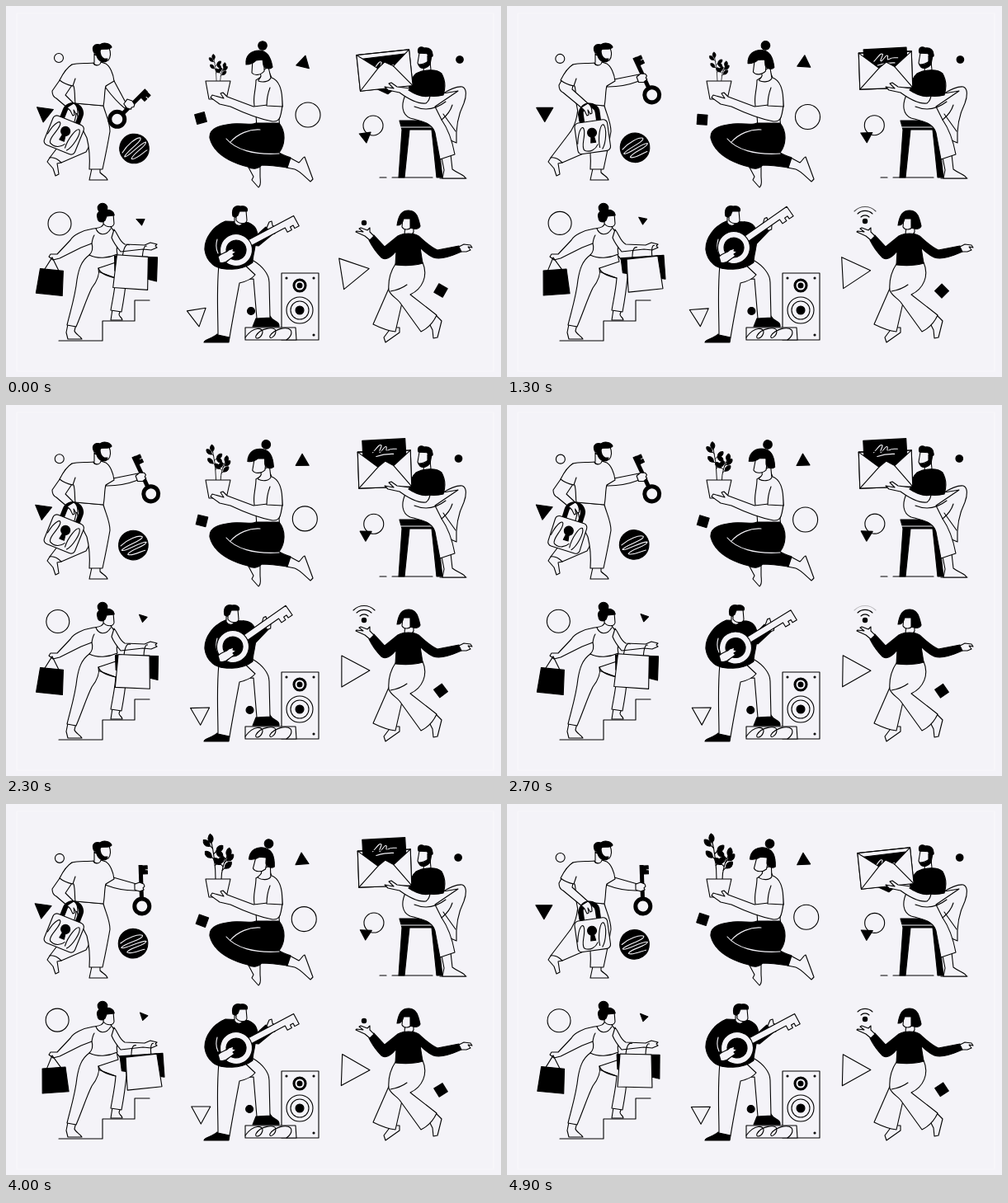
Write an HTML page that moves like this. It is 600 by 450 pixels and loops after 5000 ms.

```html
<!DOCTYPE html>
<html lang="en">
<head>
<meta charset="utf-8">
<title>Six figures</title>
<style>
:root { --paper: #f4f3f8; }
html, body { margin: 0; width: 100%; height: 100%; overflow: hidden; background: var(--paper); }
svg { display: block; width: 100%; height: 100%; fill: none; stroke: #000; stroke-width: 1.1; stroke-linejoin: round; stroke-linecap: round; }
.w { fill: var(--paper); }
.b { fill: #000; }
.l { stroke: var(--paper); }
</style>
</head>
<body>
<svg viewBox="0 0 600 450">
  <rect x="13" y="9" width="578" height="434" stroke="#f9f8fb"/>

  <!-- man with padlock and key -->
  <circle id="dotA" r="5.5"/>
  <path id="triA" class="b" d="M-10 -7H10L0 10Z"/>
  <g id="ball">
    <circle class="b" r="17.8"/>
    <path class="l" d="M-15 3C-8 -6 4 -13 9 -12C12 -8 -10 2 -13 8C-10 11 8 -6 15 -6C16 -1 -4 6 -5 12C0 14 10 6 15 4"/>
  </g>
  <path class="w" d="M86 122C85 140 80 150 72 159L53 184L50 189L57 197L60 206L64 204L62 191L67 190L97 177L112 150Z"/>
  <path d="M53 184C58 183 63 186 67 190"/>
  <path class="w" d="M104 197L101 211H123C122 207 118 206 114 202V197Z"/>
  <path class="w" d="M84 118L118 121C121 132 126 141 126 152C123 170 120 184 117 198H101C102 184 101 172 98 160L88 140Z"/>
  <path id="armR" class="w"/>
  <path class="w" d="M107 58V68C105 73 114 74 116 69V64Z"/>
  <path class="w" d="M106 69C98 70 86 69 80 71C73 76 69 83 66 91L82 97C84 104 83 112 84 118L118 121C120 112 119 104 121 97L131 91C130 82 126 73 121 70L115 68C114 73 107 73 106 69Z"/>
  <path id="armL" class="w"/>
  <path class="w" d="M80 71C73 75 69 82 65 90C70 94 76 96 81 97L84 88"/>
  <path class="w" d="M111 53L125 51C127 56 127 62 124 66C117 68 112 63 111 53Z"/>
  <path class="b" d="M109 53C109 61 112 67 118 68C121 68 123 67 123 64L119 64C115 62 114 58 114 54Z"/>
  <path class="b" d="M107 57C103 50 107 45 114 47C119 43 127 46 128 50C125 53 121 52 116 52C114 53 113 56 111 58Z"/>
  <g id="lock">
    <path d="M-10 17V5A10 9.5 0 0 1 10 5V17" stroke-width="6" stroke-linecap="butt"/>
    <rect class="w" x="-20" y="15" width="40" height="38" rx="5"/>
    <path d="M-19 40C-16 22 -9 17 -9 25C-9 34 -16 44 -12 49C-5 53 2 49 5 44M7 48C6 36 11 20 15 21C19 26 15 44 10 50"/>
    <circle class="b" cy="29" r="5.5"/><path class="b" d="M-1.5 32L-3 41H3L1.5 32Z"/>
  </g>
  <path id="handL" class="w" d="M-9 -2L-1 -7C3 -5 4 0 4 5L2 6L-1 1L0 7L-2 8L-5 2Z"/>
  <g id="key">
    <circle cy="23" r="9" stroke-width="5"/>
    <path d="M0 13V-27" stroke-width="5" stroke-linecap="butt"/>
    <path class="b" d="M2 -26H8V-22H5V-20H8V-16H2Z"/>
  </g>
  <path id="handR" class="w" d="M-8 -4L-2 -6L3 -4L4 -1L2 1L3 3L-2 5L-8 3Z"/>

  <!-- woman with plant -->
  <path id="sqB" class="b" d="M-6 -6H6V6H-6Z"/>
  <path id="triB" class="b" d="M0 -8L8 6H-8Z"/>
  <circle id="ringB" r="15"/>
  <g id="plant"></g>
  <path class="w" d="M242 91H272L267 113H246Z"/>
  <path class="w" d="M293 194L300 207L298 211L306 220C310 217 308 212 308 206V193Z"/>
  <path class="w" d="M344 184L355 190C358 188 359 184 362 183L372 210L369 213C362 207 356 200 350 198L340 196Z"/>
  <path class="w" d="M303 90C306 87 309 88 310 84L318 78L322 87C330 89 334 101 335 121L331 138L332 148H303C305 138 302 130 301 121C299 110 303 102 303 90Z"/>
  <path class="b" d="M247 160C246 147 260 145 274 143C288 142 297 145 303 142L331 142C340 153 338 169 331 178C336 181 340 182 345 184L341 196C328 194 318 193 310 193C307 197 300 199 293 195C274 190 252 180 247 160Z"/>
  <path class="l" d="M308 150C295 149 281 155 272 165M267 161C278 174 300 181 331 179"/>
  <path class="w" d="M317 120L300 122L268 110L263 105L260 106L264 112L250 108L248 111L259 119L272 122C291 131 307 137 323 140C333 141 333 132 335 121Z"/>
  <path class="w" d="M320 99C317 107 316 114 316 121L335 122C335 108 334 98 328 91"/>
  <g id="headB">
    <path class="w" d="M308 80L309 85C308 89 305 89 306 91C311 93 319 92 321 87L318 74Z"/>
    <path class="w" d="M299 64L298 81C301 85 309 84 313 79V65Z"/>
    <circle class="b" cx="311" cy="48" r="5.3"/>
    <path class="b" d="M291 71C290 60 297 54 307 54C317 54 321 62 323 74C320 77 316 76 313 74C311 71 312 68 311 65L303 66Q298 71 291 71Z"/>
  </g>

  <!-- man with letter -->
  <circle id="dotC" class="b" r="4.3"/>
  <circle id="ringC" r="12"/>
  <path id="triC" class="b" d="M-7 -6H7L0 6Z"/>
  <path d="M453 208H461M468 208H517M526 209H558"/>
  <path class="b" d="M477 139H521L529 208H522L516 150H489L483 208H476L480 150Z"/>
  <path class="l" d="M478 147H520"/>
  <path class="w" d="M528 107C538 101 546 97 553 98C559 100 558 110 555 118C549 130 545 148 546 166L532 160L512 138Z"/>
  <path class="w" d="M528 184L531 199L529 209H557C556 205 549 204 541 198L539 180Z"/>
  <path class="w" d="M485 106C478 120 480 132 490 136C505 140 517 142 520 154L526 186L544 180C541 164 535 148 528 138L520 122L548 103L530 106Z"/>
  <path d="M495 122C507 127 520 126 533 116M530 131L545 152M528 138Q538 130 541 120"/>
  <path class="w" d="M507 70L506 79C509 82 514 80 515 77L514 68Z"/>
  <path class="b" d="M497 82C506 77 522 76 528 82C532 89 533 99 530 108C520 111 508 109 499 107L488 101C490 92 492 86 497 82Z"/>
  <g id="mail">
    <path class="w" d="M-32 -22H32V22H-32Z"/>
    <g id="letter"><path class="b" d="M-26 0H26V30L0 46L-26 30Z"/><path class="l" d="M-14 15C-9 10 -5 4 -3 7C-4 12 -8 15 -5 15C-1 12 1 7 3 9C3 12 1 15 5 13C8 11 10 12 15 12M-10 20Q0 17 11 18"/></g>
    <path class="w" d="M-32 -22L-8 -3L1 -10L11 -4L32 -22V22H-32Z"/>
    <path d="M-32 22L-8 -3M32 22L11 -4M-32 -22H32"/>
  </g>
  <path class="w" d="M490 100L474 98L467 93L464 94L470 100L459 98L463 102L477 105C488 113 500 119 509 118C513 115 514 111 514 107Z"/>
  <path class="b" d="M492 98C497 92 506 90 514 96L514 109C506 111 497 108 488 102Z"/>
  <path class="w" d="M501 57L499 69C501 75 508 76 513 70L514 58Z"/>
  <path class="b" d="M511 60L511 67C508 71 503 71 500 71C502 77 509 77 514 71L516 60Z"/>
  <path class="b" d="M500 57C498 51 502 48 507 51C513 50 518 54 517 61L513 62L510 57Z"/>

  <!-- woman with bags -->
  <circle id="ringD" r="14"/>
  <path id="triD" class="b" d="M-5 -3.5H5L1.5 4Z"/>
  <path d="M64 406H117V382H156V357H174"/>
  <path class="w" d="M75 386L73 396L75 404H92C90 400 84 398 83 394L85 386Z"/>
  <path class="w" d="M129 368L127 381H141C141 378 137 377 137 374L139 368Z"/>
  <path class="w" d="M106 320L133 330C132 344 129 357 127 369L140 371C143 355 145 340 146 329C146 319 140 308 133 301Z"/>
  <path class="w" d="M101 302C91 309 88 320 86 332C84 352 78 370 74 387L85 389C93 370 98 354 104 342C111 333 114 326 112 318L136 310L134 301Z"/>
  <path d="M112 318C114 325 124 328 133 330"/>
  <path class="w" d="M119 262C118 269 112 269 106 270C93 272 81 278 78 284L62 301L54 301L52 304L57 308L65 306L91 293L104 288C106 295 104 299 101 302C111 307 124 306 135 301C133 295 135 289 136 284L133 277C131 271 126 270 126 264Z"/>
  <path d="M109 270C112 278 121 280 127 270M104 288Q105 281 107 278"/>
  <path class="w" d="M119 252L118 264C122 269 130 269 131 264L130 252Z"/>
  <circle class="b" cx="117" cy="245" r="5.8"/>
  <path class="b" d="M111 257C109 251 113 248 120 248C126 246 132 250 131 254L122 255L120 260L117 262C113 262 111 260 111 257Z"/>
  <g id="bagL"><path d="M-9 16L-1 0L9 16"/><path class="b" d="M-14 15H14L16 45H-16Z"/></g>
  <path id="bagB" class="b" d="M-26 -14H26V15L-25 4Z"/>
  <path class="w" d="M131 271C136 277 137 285 144 289L168 290L175 287L183 289L181 291L183 293L176 296L166 295L139 298C134 292 130 286 128 281Z"/>
  <g id="bagW"><path d="M-12 -20C-11 -32 -8 -34 -5 -33M12 -20C12 -30 14 -34 16 -33"/><path class="w" d="M-19 -20H19L21 20H-21Z"/></g>

  <!-- man with key guitar -->
  <path id="triE" d="M-11.5 -8H11.5L0 13Z"/>
  <circle id="dotE" class="b" r="4.5"/>
  <path class="w" d="M334 324H379V405H334Z"/>
  <g class="b">
    <circle cx="340" cy="330" r="1"/><circle cx="373" cy="330" r="1"/>
    <circle cx="340" cy="399" r="1"/><circle cx="373" cy="399" r="1"/>
    <circle cx="356" cy="339" r="8"/><circle cx="356" cy="369" r="5"/>
  </g>
  <circle class="l" cx="356" cy="339" r="4.5" stroke-width="2"/>
  <circle cx="356" cy="369" r="16"/><circle cx="356" cy="369" r="11"/>
  <path class="w" d="M290 390H351L352 405H290Z"/>
  <path d="M290 402C300 388 312 390 311 396C309 404 301 405 303 400C308 391 325 388 327 394C327 402 318 405 320 400C325 392 340 388 345 393C348 398 343 403 340 405"/>
  <path class="b" d="M256 398L271 402L270 408H240C240 404 250 404 256 398ZM303 379L320 376C323 383 332 382 331 389H299Z"/>
  <path class="w" d="M270 333L300 331L304 379L320 378L319 335C319 325 310 315 300 309L275 314Z"/>
  <path class="w" d="M258 314C255 345 257 375 257 399L271 402C275 378 280 352 283 336C292 334 298 331 302 326L285 310Z"/>
  <path class="b" d="M266 261C252 266 240 282 241 296C243 311 255 320 270 319C282 320 293 316 299 311C299 300 304 292 303 276C302 268 297 263 290 262Z"/>
  <path class="l" d="M256 283C254 290 255 296 257 300"/>
  <g id="headE">
    <path class="w" d="M277 256V263C280 268 286 267 287 262V256Z"/>
    <path class="w" d="M279 249V260C283 265 291 265 292 260L291 248Z"/>
    <path class="b" d="M275 255C273 246 277 241 284 243C290 242 294 245 292 249H283L281 254L278 256Z"/>
  </g>
  <g id="armE">
    <path class="b" d="M294 263C303 267 304 272 305 277L315 268L323 277L306 291L298 290Z"/>
    <path class="w" d="M316 269L319 262L322 261L323 266L327 270L326 276L322 277Z"/>
  </g>
  <g id="guitar">
    <path class="w" d="M17 -4H81V10H75V6H71V10H65V4H17Z"/>
    <circle class="w" r="19.5"/><circle class="b" r="12"/>
  </g>
  <path class="w" d="M257 304C262 299 266 300 270 296L276 294L275 297L279 298L275 301L277 303L270 308C266 312 262 312 259 311Z"/>

  <!-- dancing woman -->
  <path id="triF" d="M-12 -19L22 -1L-12 19Z"/>
  <path id="sqF" class="b" d="M-6 -6H6V6H-6Z"/>
  <path class="w" d="M467 390L458 402L460 408L477 396V390ZM511 381L517 393L518 403L523 402L528 382L520 374Z"/>
  <path class="w" d="M466 338C459 354 452 370 445 386C453 390 463 394 472 395L480 360Z"/>
  <path class="w" d="M472 313C466 322 463 333 464 345C467 352 473 354 477 359L503 395C511 391 518 384 522 375L490 350C505 343 512 327 505 311Z"/>
  <path d="M466 346Q478 344 486 338"/>
  <path class="w" d="M484 268L483 276C487 280 493 278 494 274V265Z"/>
  <path class="b" d="M446 278L459 292L475 279C482 275 494 275 500 279C508 286 515 293 523 296L549 291L552 298C540 303 528 308 518 305C511 302 506 297 502 293L505 312C495 315 482 315 472 314L473 297C467 305 460 309 455 305C450 300 444 292 440 284Z"/>
  <path class="w" d="M441 284L435 279L424 274L425 273L433 274L428 270L430 269L438 272L441 269L441 274L446 279Z"/>
  <path class="w" d="M549 292L555 289L563 290L565 293L560 292L563 296L558 298L552 298Z"/>
  <path class="w" d="M481 256L480 268C483 273 489 271 492 268V256Z"/>
  <path class="b" d="M474 266C476 253 480 248 488 248C498 248 500 258 502 267C500 271 495 271 490 269L490 258L482 258C481 262 479 266 474 266Z"/>
  <g id="beam">
    <circle class="b" r="2.7"/>
    <path class="arc" d="M-5 -5A7 7 0 0 1 5 -5"/>
    <path class="arc" d="M-9 -9A13 13 0 0 1 9 -9"/>
    <path class="arc" d="M-13 -12A18 18 0 0 1 13 -12"/>
  </g>
</svg>
<script>
const LOOP = 5000, STEP = 100;
const $ = id => document.getElementById(id);
const arcs = document.querySelectorAll('.arc');

const clamp = v => Math.max(0, Math.min(1, v));
const ramp = (t, from, to) => {
  const u = clamp((t - from) / (to - from));
  return u * u * (3 - 2 * u);
};
const pulse = (t, rise, top, fall, end) => ramp(t, rise, top) - ramp(t, fall, end);
const wave = (t, period, peak = 0) => (1 + Math.cos(2 * Math.PI * (t - peak) / period)) / 2;

function place(id, x, y, angle = 0, scale = 1) {
  $(id).setAttribute('transform', `translate(${x} ${y}) rotate(${angle}) scale(${scale})`);
}

// A bent stem with leaves on alternating sides and one at the tip
function stem(x0, lean, height) {
  const at = u => [x0 + lean * u * u, -height * u];
  const leaf = (x, y, a) =>
    `<path class="b" d="M0 5C-5 1 -3 -4 0 -6C3 -4 5 1 0 5Z" transform="translate(${x} ${y}) rotate(${a})"/>`;
  let parts = `<path d="M${x0} 0Q${x0} ${-height / 2} ${at(1)}"/>` + leaf(...at(1), lean);
  for (let i = 0; i < 4; i++) {
    const [x, y] = at(.35 + .14 * i), side = i % 2 ? -1 : 1;
    parts += `<path d="M${x} ${y}l${side * 4} -4"/>` + leaf(x + side * 7, y - 6, side * 45);
  }
  return parts;
}
$('plant').innerHTML = stem(-3, -6, 50) + stem(4, 9, 33);

function drawShapes(t, step) {
  const shift = 1 - wave(t, 7000);
  const turn = 1 - (1 - t / 4000) ** 2;
  const drift = (id, x, y, dx, dy, angle = 0, spin = 0) =>
    place(id, x + dx * shift, y + dy * shift, angle + spin * turn);

  place('triA', 46.5 - 2.5 * shift, 131 - 2 * shift, 8 - 8 * step);
  drift('dotA', 64, 63, 1, 3);
  drift('ball', 155.5, 173, -1.5, -4, -8, 20);
  drift('ringB', 366, 132, -5, 8);
  drift('triB', 361, 68, -2.5, -1, 14, -18);
  drift('sqB', 236, 136, 2, 6, -15, 35);
  drift('dotC', 550, 65, -2, 0);
  drift('ringC', 445, 145, 1, -1);
  drift('triC', 436, 160, 0, -1, -8, 11);
  drift('ringD', 65, 264, -3, -2);
  drift('triD', 163, 262, 3, -4, 0, 22);
  drift('triE', 232, 376, 4.5, -1, -9, 9);
  drift('dotE', 297, 370, -2, 0);
  drift('triF', 418.5, 323, .5, 0, -9, 11);
  drift('sqF', 527, 345, 0, 2, 30, 28);
}

function drawKeyArm(t) {
  const raise = ramp(t, 0, 1250), lower = ramp(t, 3300, 4000);
  const x = 151 + 15 * raise - 2 * lower;
  const y = 121 - 34 * raise + 14 * lower;
  const angle = 45 - 70 * raise + 23 * lower;
  place('key', x, y, angle);
  place('handR', x, y, angle * .8);
  $('armR').setAttribute('d', `M130 89L${x - 6} ${y - 4}V${y + 4}Q${(115 + x) / 2} ${(98 + y) / 2 + 6} 120 98Z`);
}

function drawLockArm(step, pause) {
  const x = 83 + 16 * step + 3 * pause, y = 125;
  const ex = 56 + 7 * step, ey = 103 - 7 * step;
  place('lock', x, y, 22 - 30 * step - 22 * pause);
  place('handL', x, y);
  $('armL').setAttribute('d', `M70 83L${ex} ${ey}Q${ex} ${ey + 7} ${ex + 5} ${ey + 9}L${x - 8} ${y - 1}L${x - 1} ${y - 7}L${ex + 16} ${ey + 5}L80 96Z`);
}

function draw(t) {
  const step = pulse(t, 200, 700, 1400, 2200) + ramp(t, 4200, 4900);
  drawShapes(t, step);
  drawKeyArm(t);
  drawLockArm(step, pulse(t, 2500, 3200, 3300, 3900));

  place('plant', 257, 92, 0, .6 + .4 * ramp(t, 500, 4300));
  $('headB').setAttribute('transform', `rotate(${11 * clamp(t / 4000)} 314 87)`);

  const open = pulse(t, 700, 1900, 4200, 4800);
  place('mail', 459, 78, -6 + 4 * clamp(2 * open));
  place('letter', 0, -17 - 19 * open, -1);

  const sway = wave(t, 2700, 1300);
  place('bagL', 57, 305, 6 - 10 * sway * sway);
  place('bagB', 157 + 8 * sway, 318, 2 - 6 * sway);
  place('bagW', 152 + 14 * sway, 323 + 2 * sway, 4 - 10 * sway);

  const lift = pulse(t, 700, 1300, 2300, 3100);
  place('guitar', 279 - 4 * lift, 296 - 3 * lift, -28 - 7 * lift);
  $('armE').setAttribute('transform', `translate(${-4 * lift} ${-2 * lift}) rotate(${-7 * lift} 300 285)`);
  place('headE', -10 * lift, 0);

  const rays = 3 * (pulse(t, 500, 1500, 2600, 2900) + ramp(t, 4300, 5300));
  place('beam', 434, 263 - 2 * clamp(rays));
  arcs.forEach((arc, i) => arc.setAttribute('opacity', clamp(rays - i)));
}

const start = performance.now();
function tick() {
  const t = (performance.now() - start) % LOOP;
  draw(Math.floor(t / STEP) * STEP);
  requestAnimationFrame(tick);
}
tick();
</script>
</body>
</html>
```
